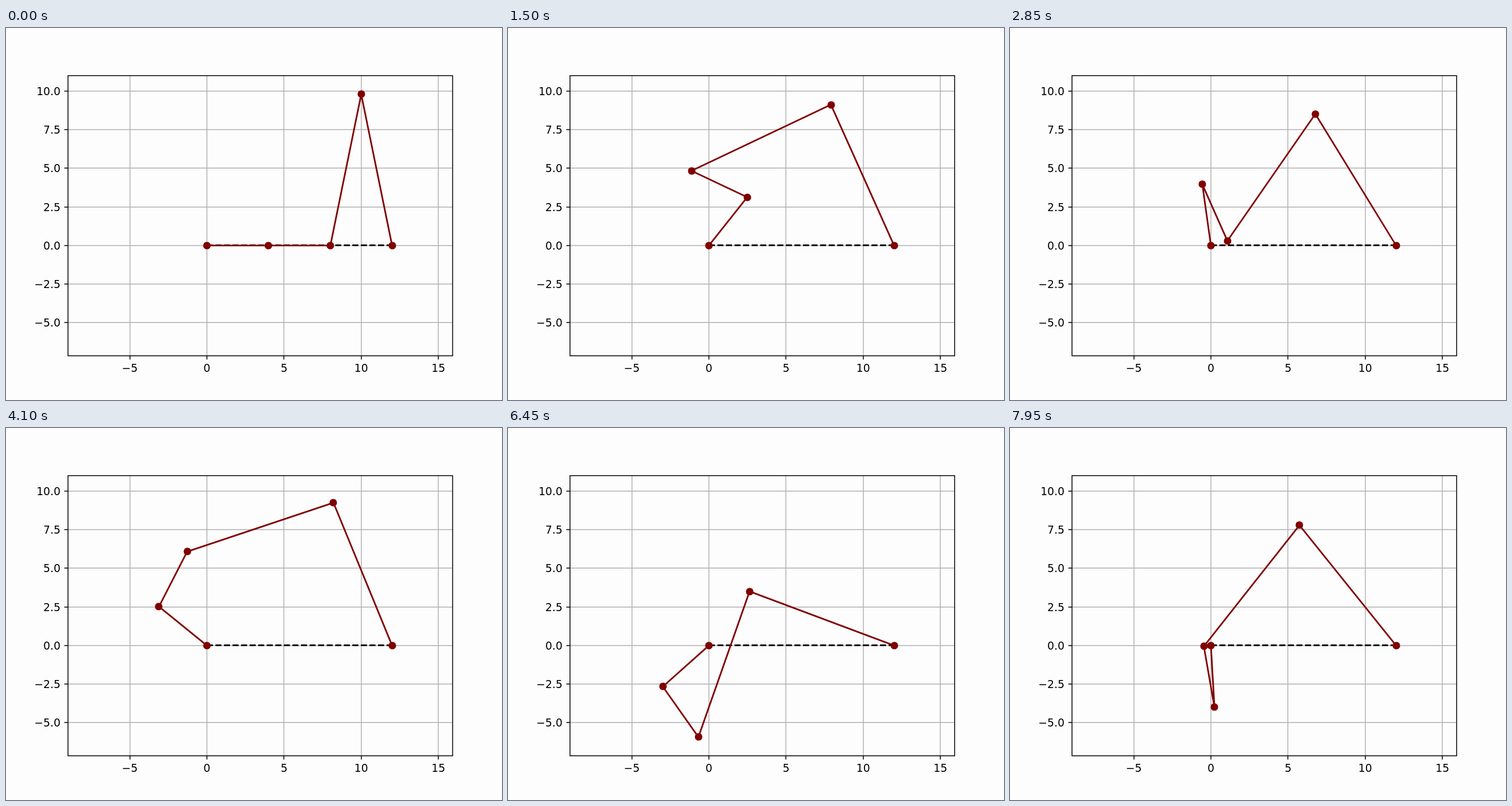
Recreate the animation shown at these times as an HTML page with a canvas. Size 864x648 px, loop 8 s.

```html
<!DOCTYPE html>
<html lang="en">
<head>
<meta charset="utf-8">
<title>Five-bar linkage</title>
<style>
  html, body { margin: 0; width: 100%; height: 100%; overflow: hidden; background: #fdfdfd; }
  canvas { display: block; }
</style>
</head>
<body>
<canvas id="stage" width="864" height="648"></canvas>
<script>
const ctx = document.getElementById('stage').getContext('2d');

const STEP_MS = 50, STEPS = 160, STEP_ANGLE = 0.03;
const CRANK = 4, ARM = 10, BASE = 12;
const UNIT = 26.883, ORIGIN = { x: 349.95, y: 378.88 };
const BOX = { left: 108, top: 83, right: 778, bottom: 571 };
const TICK = 6.5, LINK_WIDTH = 2.8125;

const toX = x => ORIGIN.x + x * UNIT;
const toY = y => ORIGIN.y - y * UNIT;
const label = (value, digits) => value.toFixed(digits).replace('-', '\u2212');

function line(color, width, ...points) {
  ctx.strokeStyle = color;
  ctx.lineWidth = width;
  ctx.beginPath();
  for (const [x, y] of points) ctx.lineTo(x, y);
  ctx.stroke();
}

function drawAxes() {
  const { left, top, right, bottom } = BOX;
  ctx.font = '18.75px "DejaVu Sans", sans-serif';
  ctx.fillStyle = '#000';

  ctx.textAlign = 'center';
  for (let v = -5; v <= 15; v += 5) {
    const x = Math.round(toX(v));
    line('#b0b0b0', 1.5, [x, top], [x, bottom]);
    line('#000', 1.5, [x, bottom], [x, bottom + TICK]);
    ctx.fillText(label(v, 0), toX(v), 599);
  }

  ctx.textAlign = 'right';
  for (let v = -5; v <= 10; v += 2.5) {
    const y = Math.round(toY(v));
    line('#b0b0b0', 1.5, [left, y], [right, y]);
    line('#000', 1.5, [left, y], [left - TICK, y]);
    ctx.fillText(label(v, 1), 94.9, y + 7);
  }
}

function drawFrame() {
  ctx.strokeStyle = '#000';
  ctx.lineWidth = 1.5;
  ctx.strokeRect(BOX.left, BOX.top, BOX.right - BOX.left, BOX.bottom - BOX.top);
}

// The second crank turns three times as fast; two equal arms close the chain.
function joints(angle) {
  const elbow = [CRANK * Math.cos(angle), CRANK * Math.sin(angle)];
  const tip = [elbow[0] + CRANK * Math.cos(3 * angle), elbow[1] + CRANK * Math.sin(3 * angle)];
  const dx = BASE - tip[0], dy = -tip[1];
  const span = Math.hypot(dx, dy);
  const rise = Math.sqrt(Math.max(0, ARM * ARM - span * span / 4)) / span;
  const apex = [tip[0] + dx / 2 - dy * rise, tip[1] + dy / 2 + dx * rise];
  return [[0, 0], elbow, tip, apex, [BASE, 0]];
}

function drawLinkage(angle) {
  ctx.setLineDash([3.7 * LINK_WIDTH, 1.6 * LINK_WIDTH]);
  line('#000', LINK_WIDTH, [toX(0), 378.5], [toX(BASE), 378.5]);
  ctx.setLineDash([]);

  const points = joints(angle).map(([x, y]) => [toX(x), toY(y)]);
  ctx.lineJoin = 'round';
  line('#800000', LINK_WIDTH, ...points);
  ctx.lineJoin = 'miter';

  ctx.fillStyle = '#800000';
  for (const [x, y] of points) {
    ctx.beginPath();
    ctx.arc(Math.round(x), Math.round(y), 6.56, 0, 2 * Math.PI);
    ctx.fill();
  }
}

function render() {
  const step = Math.floor(performance.now() / STEP_MS) % STEPS;
  ctx.fillStyle = '#fdfdfd';
  ctx.fillRect(0, 0, 864, 648);
  drawAxes();
  drawLinkage(step * STEP_ANGLE);
  drawFrame();
  requestAnimationFrame(render);
}
render();
</script>
</body>
</html>
```
